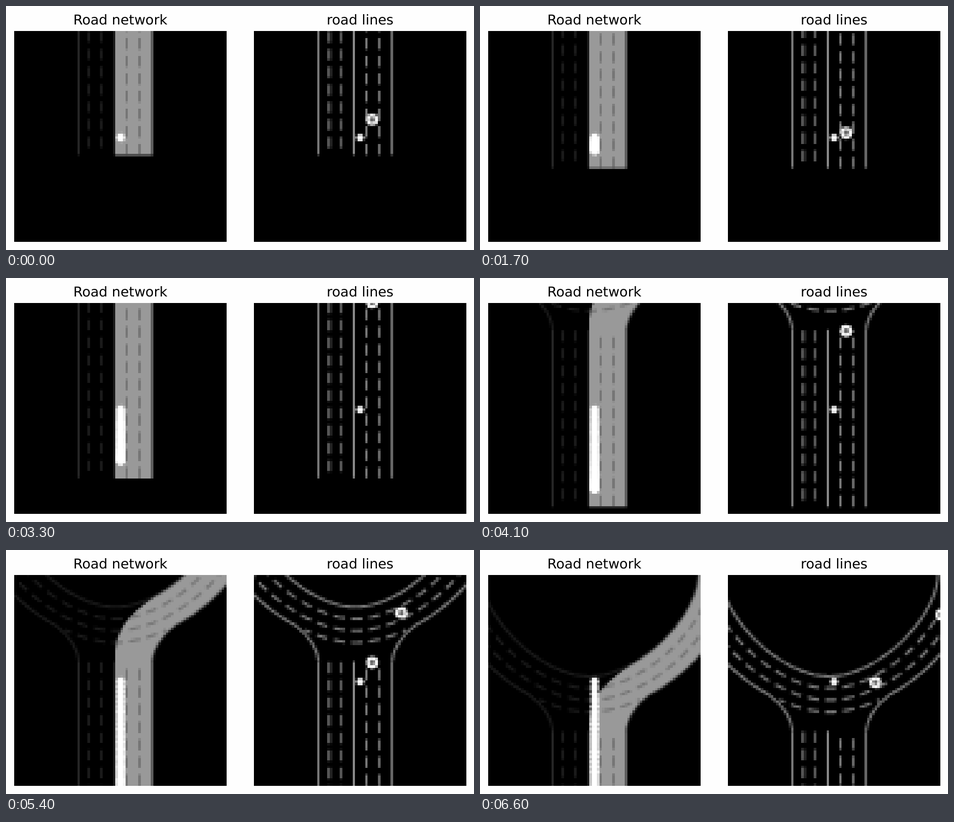
Recreate the animation shown at these times as an HTML page with a canvas. Size 857x449 px, loop 6.7 s.

```html
<!DOCTYPE html>
<html lang="en">
<head>
<meta charset="utf-8">
<title>Road views</title>
<style>
  html, body { margin: 0; width: 100%; height: 100%; overflow: hidden; background: #fefefe; }
  canvas, svg { position: absolute; left: 0; top: 0; display: block; }
  text {
    font: 25px "DejaVu Sans", sans-serif;
    text-anchor: middle;
    text-rendering: geometricPrecision;
    fill: #000;
  }
</style>
</head>
<body>
<canvas id="stage" width="857" height="449"></canvas>
<svg width="857" height="449">
  <text x="209.3" y="34">Road network</text>
  <text x="648.5" y="34">road lines</text>
</svg>
<script>
const LOOP = 6700, STEP = 100;
const N = 84, CELL_W = 389 / N, CELL_H = 4.62, TOP = 45.6;
const LEFT_X = 15, RIGHT_X = 454;
const EGO_X = 42, EGO_Y = 42.5;
const AXIS = 40.1, RING_LOW = -42.8, LANE = 4.74;
const ROAD_TOP = -21, ROAD_END = 49.4;
const JOIN = 0.31; // where the kerb meets the outer ring line
const CHECKPOINTS = [[46.8, 35.4], [46.8, -20.6], [58.3, -40.4], [84.4, -67.3]];

const stage = document.getElementById('stage').getContext('2d');
const grid = document.createElement('canvas');
grid.width = grid.height = N;
const g = grid.getContext('2d', { willReadFrequently: true });

// Distance driven, in cells, under constant acceleration
function travel(step) {
  if (step < 6) step -= step % 2;
  const t = Math.max(0, step / 10 - 0.05);
  return 1.94 * t * t;
}

function clear() {
  g.setTransform(1, 0, 0, 1, 0, 0);
  g.fillStyle = '#000';
  g.fillRect(0, 0, N, N);
}

function disc(x, y, r, color) {
  g.fillStyle = color;
  g.beginPath();
  g.arc(x, y, r, 0, 2 * Math.PI);
  g.fill();
}

function column(col, color) {
  g.fillStyle = color;
  g.fillRect(col, ROAD_TOP, 1, ROAD_END - ROAD_TOP);
}

function dashes(col, offset, length, color) {
  g.fillStyle = color;
  for (let y = ROAD_END - offset; y >= ROAD_TOP - 1; y -= 7) {
    g.fillRect(col, y, 1, length);
  }
}

// Point on ring line i (0 is innermost): t runs from the lowest point to the side
function ringPoint(i, side, t) {
  const u = 1 - t;
  const w1 = 3 * t * u * u, w2 = 3 * t * t * u, w3 = t * t * t;
  const dx = w1 * (19.5 + 1.5 * i) + (w2 + w3) * (43 + LANE * i);
  const rise = w2 * (23.8 + 0.75 * i) + w3 * (41.1 + 4.5 * i);
  return [AXIS + side * dx, RING_LOW + LANE * i - rise];
}

function ringPath(i, side, from, to) {
  const count = 48;
  for (let k = 0; k <= count; k++) {
    g.lineTo(...ringPoint(i, side, from + (to - from) * k / count));
  }
}

function strokeRing(i, side, from, to) {
  g.beginPath();
  ringPath(i, side, from, to);
  g.stroke();
}

function dashRing(i, side, to) {
  g.setLineDash([4.4, 2.6]);
  g.lineDashOffset = side > 0 ? 1.6 : 2.8;
  strokeRing(i, side, 0, to);
  g.setLineDash([]);
}

// Kerb that bends from the straight road out to the ring
function kerb(side) {
  const x = d => AXIS + side * d;
  g.bezierCurveTo(x(15), -26.5, x(18.8), -31.5, ...ringPoint(3, side, JOIN));
}

function curves(color) {
  g.lineWidth = 1.1;
  g.strokeStyle = color;
  for (const side of [-1, 1]) {
    strokeRing(0, side, 0, 1);
    dashRing(1, side, 1);
    dashRing(2, side, 1);
    dashRing(3, side, JOIN - 0.05);
    g.beginPath();
    g.moveTo(AXIS + side * 14.5, ROAD_TOP);
    kerb(side);
    ringPath(3, side, JOIN, 1);
    g.stroke();
  }
}

function route() {
  g.fillStyle = '#999';
  g.beginPath();
  g.moveTo(54.6, ROAD_END);
  g.lineTo(54.6, ROAD_TOP);
  kerb(1);
  ringPath(3, 1, JOIN, 1);
  ringPath(0, 1, 1, JOIN);
  g.bezierCurveTo(50, -43.5, 40.2, -36, 40, -25);
  g.lineTo(40, ROAD_END);
  g.fill();
}

function drawNetwork(step) {
  const s = travel(step);
  const edge = 'rgba(95,95,95,.4)', dash = 'rgba(65,65,65,.4)';
  clear();
  g.translate(0, s);
  route();
  column(25, edge);
  column(39, dash);
  column(54, edge);
  for (const col of [29, 34]) dashes(col, 7.1, 4.2, dash);
  for (const col of [44, 49]) dashes(col, 4.45, 4.45, dash);
  curves(dash);
  for (let k = 0; k <= step; k++) {
    if (k === 0 || k > 3) disc(EGO_X + 0.1, EGO_Y - travel(k), 1.65, '#fff');
  }
}

function drawLines(step) {
  const s = travel(step);
  clear();
  g.translate(0, s);
  column(25, '#777');
  column(39, '#888');
  column(54, '#666');
  dashes(29, 7.1, 4.4, '#555');
  dashes(30, 7.1, 4.4, '#222');
  dashes(34, 7.1, 4.4, '#555');
  dashes(44, 4.45, 4.45, '#777');
  dashes(49, 4.45, 4.45, '#666');
  curves('#777');
  const ahead = CHECKPOINTS.filter(p => p[1] + s < 43).slice(0, 2);
  for (const [x, y] of ahead) {
    disc(x, y, 2.45, '#fff');
    disc(x, y, 1.15, '#666');
  }
  disc(EGO_X, EGO_Y - s, 1.5, '#fff');
}

// Enlarges the small grid to hard-edged cells
function blit(x0) {
  const data = g.getImageData(0, 0, N, N).data;
  const xs = i => Math.round(x0 + i * CELL_W);
  const ys = i => Math.round(TOP + i * CELL_H);
  stage.fillStyle = '#000';
  stage.fillRect(xs(0), ys(0), xs(N) - xs(0), ys(N) - ys(0));
  for (let row = 0; row < N; row++) {
    const y = ys(row), h = ys(row + 1) - y;
    for (let col = 0; col < N; col++) {
      const v = data[(row * N + col) * 4];
      if (v < 3) continue;
      const x = xs(col);
      stage.fillStyle = `rgb(${v},${v},${v})`;
      stage.fillRect(x, y, xs(col + 1) - x, h);
    }
  }
}

const start = performance.now();
let shown = -1;

function tick() {
  const step = Math.floor(((performance.now() - start) % LOOP) / STEP);
  if (step !== shown) {
    shown = step;
    drawNetwork(step);
    blit(LEFT_X);
    drawLines(step);
    blit(RIGHT_X);
  }
  requestAnimationFrame(tick);
}
tick();
</script>
</body>
</html>
```
